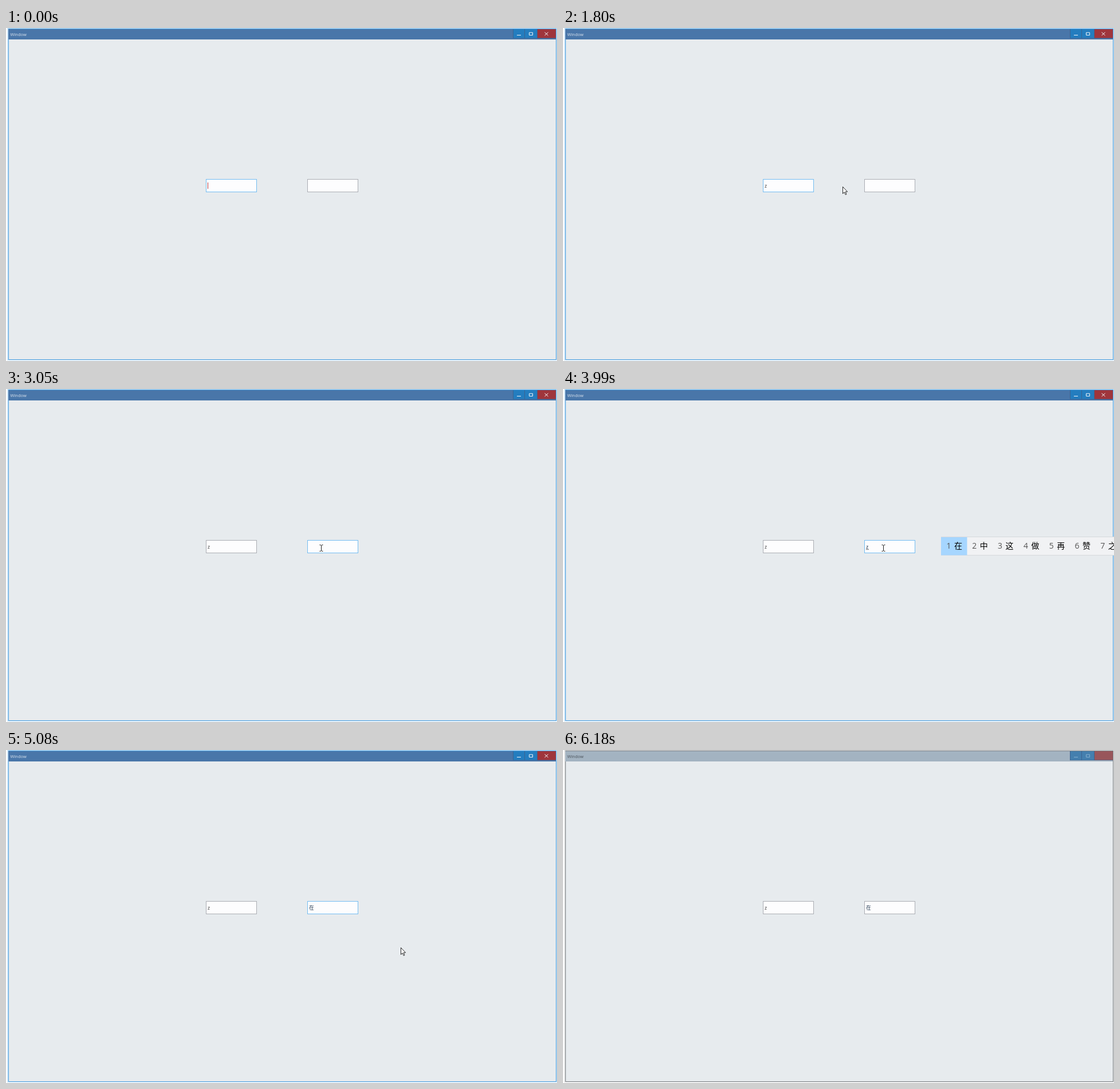
Animation of 962 by 582 pixels, one loop 6.25 s. Source, as an HTML page:

```html
<!DOCTYPE html>
<html>
<head>
<meta charset="utf-8">
<style>
  html, body { margin: 0; width: 100%; height: 100%; overflow: hidden; background: #fff; }
  svg { display: block; width: 962px; height: 582px; font-family: "Open Sans", "Noto Sans", sans-serif; }
  .glow { fill: none; stroke: #6ab4ec; stroke-width: 2; opacity: .35; }
  .frame { fill: #e7ebee; stroke: #4f9fdd; }
  .bar { fill: #4976a9; }
  .title { fill: #dbe4ee; font-size: 7.5px; }
  .blue { fill: #247dbf; }
  .red { fill: #9f353c; }
  .icon { fill: none; stroke: #f4f7fa; }
  .field { fill: #fdfdfe; stroke: #abadb3; }
  .field.lit { stroke: #74bcf1; }
  .cjk { font-family: "Noto Sans CJK SC", "Noto Sans CJK", sans-serif; }
  .idle .glow { stroke: #a5a9ac; }
  .idle .frame { stroke: #7d8286; }
  .idle .bar { fill: #a3b3c1; }
  .idle .title { fill: #4a525a; }
  .idle .blue { fill: #447fae; }
  .idle .red { fill: #98565b; }
  .idle .icon { stroke: #86b0d0; }
  .idle .cross { stroke: none; }
</style>
</head>
<body>
<svg id="stage" viewBox="0 0 962 582">
  <rect class="glow" x="3" y="1" width="958" height="579"/>
  <rect class="frame" x="4.5" y="1.5" width="956" height="578"/>
  <rect class="bar" x="4" y="2" width="956" height="18"/>
  <text class="title" x="7.5" y="14">Window</text>
  <rect x="885" y="2" width="75" height="16" fill="#3b6391"/>
  <rect class="blue" x="886" y="2" width="19" height="15.5"/>
  <rect class="blue" x="906" y="2" width="21" height="15.5"/>
  <rect class="red" x="928" y="2" width="32" height="15.5"/>
  <path class="icon" d="M892 12.5h7M913.5 8h6v4.5h-6z"/>
  <path class="icon cross" d="M940.5 7.5l6 5.5M946.5 7.5l-6 5.5"/>
  <rect id="left" class="field" x="349.5" y="264.5" width="88" height="22"/>
  <rect id="right" class="field" x="526.5" y="264.5" width="88" height="22"/>
  <text id="leftText" x="352" y="279" font-size="8.5" fill="#333"></text>
  <text id="rightText" class="cjk" x="529" y="279" font-size="8.8" fill="#20364e"></text>
  <path id="underline" d="M529 280.5h5" stroke="#444" stroke-width=".8"/>
  <rect id="caret" y="270" width="1" height="11"/>
  <g id="list" font-size="14">
    <rect x="660.5" y="258.5" width="330" height="32" fill="#f1f2f4" stroke="#d6d9dc"/>
    <rect x="660" y="259" width="45.5" height="31.5" fill="#a6d6ff"/>
  </g>
  <path id="arrow" d="M.5 .5V12.5L3.2 9.9 5.2 14.3 7 13.5 5 9.2H8.6Z" fill="#fff" stroke="#111" stroke-width=".9"/>
  <path id="beam" d="M-3.5 -5.5H-2L-.5 -4.5 1 -5.5H2.5M-.5 -4.5V4.5M-3.5 5.5H-2L-.5 4.5 1 5.5H2.5" fill="none" stroke="#222"/>
</svg>
<script>
const LOOP = 6250, STEP = 78, BLINK = 540;
const TYPE = 1110, FOCUS = 2440, COMPOSE = 3360, SUGGEST = 3440, COMMIT = 4310, BLUR = 6180;
const $ = id => document.getElementById(id);

// The pointer travels between these stops in steps of STEP ms.
const stops = [
  { x: 950, y: 497 },
  { at: 410, steps: 4, x: 486, y: 293 },
  { at: 810, steps: 5, x: 410, y: 276 },
  { at: 1650, steps: 9, x: 545, y: 278, ease: 2.13 },
  { at: 2970, steps: 5, x: 560, y: 278 },
  { at: 4690, steps: 3, x: 617, y: 272 },
  { at: 5080, steps: 3, x: 843, y: 500, ease: .95 },
  { at: 5630, steps: 4, x: 904, y: 560 }
];
const GONE = 5940;

// Each of these restarts the caret's blinking at a new place.
const carets = [
  { at: 70 - BLINK, x: 352, color: "#b8353f" },
  { at: TYPE, x: 357 }, { at: FOCUS, x: 529 },
  { at: SUGGEST, x: 534 }, { at: COMMIT, x: 538 }
];

[..."在中这做再赞之"].forEach((word, i) => {
  const x = 669.5 + i * 44.8;
  $("list").insertAdjacentHTML("beforeend",
    `<text x="${x}" y="279" fill="#555">${i + 1}</text>` +
    `<text class="cjk" x="${x + 13.5}" y="279">${word}</text>`);
});

const show = (id, on) => $(id).setAttribute("visibility", on ? "visible" : "hidden");
const within = (t, a, b) => t >= a && t < b;

function pointerAt(t) {
  const i = stops.findLastIndex(s => t >= s.at);
  if (i < 0 || t >= GONE) return null;
  const from = stops[i - 1], { at, steps, x, y, ease = 1 } = stops[i];
  const step = Math.min(steps, Math.floor((t - at + 8) / STEP) + 1);
  const k = 1 - (1 - step / steps) ** ease;
  return [Math.round(from.x + (x - from.x) * k), Math.round(from.y + (y - from.y) * k)];
}

function drawCaret(t) {
  const { at, x, color = "#333" } = carets.findLast(c => t >= c.at);
  $("caret").setAttribute("x", x);
  $("caret").setAttribute("fill", color);
  show("caret", t < GONE && (t - at) % (2 * BLINK) < BLINK);
}

function draw(t) {
  const p = pointerAt(t);
  const over = x => !!p && within(p[0], x, x + 89) && within(p[1], 264, 287);
  const overLeft = over(349), overRight = over(526), onField = overLeft || overRight;
  const idle = t >= BLUR;

  $("stage").classList.toggle("idle", idle);
  $("left").classList.toggle("lit", t < FOCUS || overLeft);
  $("right").classList.toggle("lit", within(t, FOCUS, BLUR) || overRight);
  $("leftText").textContent = t >= TYPE ? "z" : "";
  $("rightText").textContent = t < COMPOSE ? "" : t < COMMIT ? "z" : "在";
  show("underline", within(t, COMPOSE, COMMIT));
  show("list", within(t, SUGGEST, COMMIT));
  drawCaret(t);

  show("arrow", p && !onField);
  show("beam", p && onField);
  if (p) $(onField ? "beam" : "arrow").setAttribute("transform", `translate(${p})`);
}

let begin;
function tick(now) {
  begin ??= now;
  draw((now - begin) % LOOP);
  requestAnimationFrame(tick);
}
draw(0);
requestAnimationFrame(tick);
</script>
</body>
</html>
```
